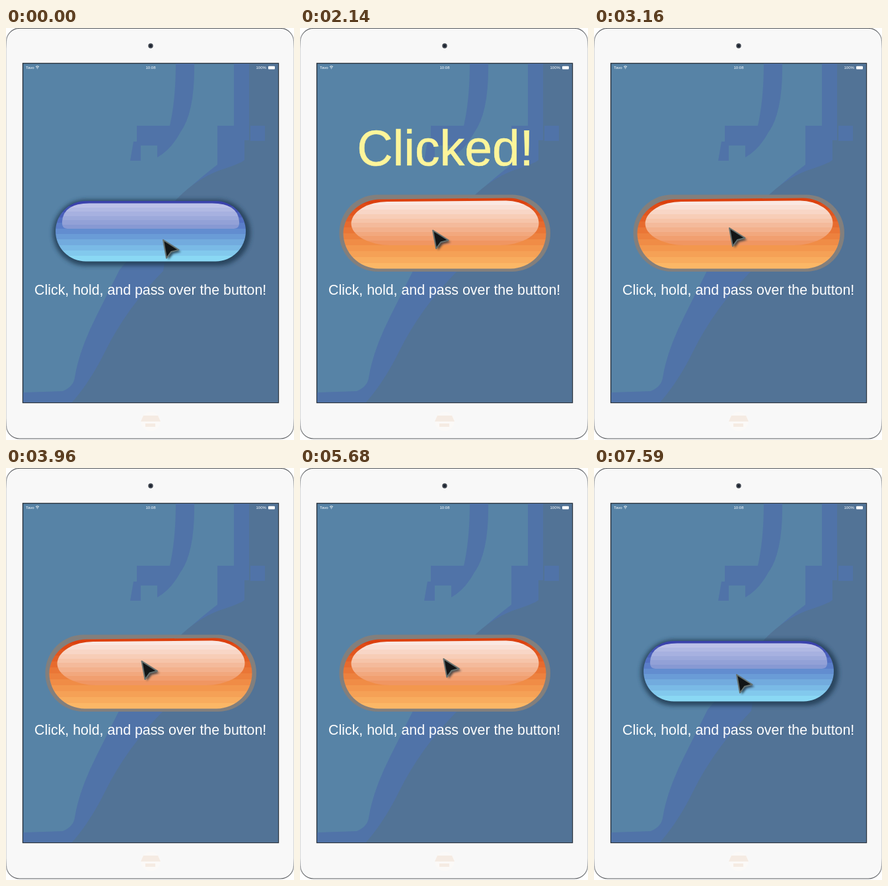
These frames come from a looping animation (436 px wide and 624 px high, 8.35 s). An HTML page:

```html
<!DOCTYPE html>
<html lang="en">
<head>
<meta charset="utf-8">
<title>Button demo</title>
<style>
  html, body { margin: 0; width: 100%; height: 100%; overflow: hidden; background: #fff; }
  svg { display: block; width: 436px; height: 624px; }
  text { font-family: "Liberation Sans", Arial, sans-serif; fill: #fff; }
</style>
</head>
<body>
<svg viewBox="0 0 436 624">
  <defs id="defs">
    <linearGradient id="rim" x1="0" y1="0" x2="0" y2="1">
      <stop offset="0" stop-color="#55585c"/><stop offset=".05" stop-color="#d9dadb"/>
      <stop offset=".95" stop-color="#d9dadb"/><stop offset="1" stop-color="#55585c"/>
    </linearGradient>
    <filter id="soft" x="-20%" y="-30%" width="140%" height="160%"><feGaussianBlur stdDeviation="3"/></filter>
    <filter id="fuzz" x="-50%" y="-50%" width="200%" height="200%"><feGaussianBlur stdDeviation="1.5"/></filter>
    <clipPath id="screen"><rect x="26" y="54" width="386" height="513"/></clipPath>
  </defs>

  <!-- tablet -->
  <rect x=".5" y=".5" width="435" height="621.5" rx="20" fill="#f8f8f8" stroke="url(#rim)" stroke-width="1.2"/>
  <circle cx="219" cy="27" r="3.7" fill="#3e444d"/><circle cx="219" cy="27" r="1.7" fill="#151d2b"/>
  <circle cx="219" cy="596" r="14.5" fill="#fbf9f7"/>
  <path d="M208 587h22l4 9h-30zM211 599h15v5h-15z" fill="#f5ebe3"/>
  <rect x="25.5" y="53.5" width="387" height="514" fill="#5783a6" stroke="#27313c" stroke-width="1.4"/>

  <!-- wallpaper -->
  <g clip-path="url(#screen)">
    <path d="M345 54H412V567H26V552L86 550Q102 543 104 530Q110 490 136 438L172 366L262 258Q282 236 320 207V148H345Z" fill="#5073a8"/>
    <path d="M368 54H412V567H100Q128 535 150 490Q182 425 238 368L256 262Q284 231 322 216Q356 205 361 200V170H368Z" fill="#527396"/>
    <path d="M370 148h22v23h-22z" fill="#5073a8"/>
    <path d="M257 54H285Q286 128 264 158Q250 184 229 196V178H204V201H188L193 172H198V148H248Q257 108 257 54Z" fill="#5073a8"/>
  </g>

  <!-- status bar -->
  <g font-size="6">
    <text x="30" y="62.3">Tavo</text>
    <text x="219" y="62.3" text-anchor="middle">10:08</text>
    <text x="378.5" y="62.3">100%</text>
  </g>
  <path d="M45 58.6q2.5-2 5 0M46 60.2q1.5-1.3 3 0M47.1 61.6h.8" fill="none" stroke="#fff" stroke-width=".9"/>
  <rect x="397" y="57.8" width="10" height="4.6" rx="1" fill="#fff"/>

  <g id="idle">
    <rect x="71" y="260" width="299" height="100" rx="50" fill="#203d55" opacity=".85" filter="url(#soft)"/>
    <rect x="75" y="262" width="288" height="91.5" rx="45.7" fill="url(#blue)"/>
    <path d="M85 293Q87 265.5 126 265.5H312Q351 265.5 353 293Q354 304 345 304H93Q84 304 85 293Z" fill="url(#blueGloss)"/>
  </g>

  <g id="hot">
    <rect x="59.5" y="252.5" width="319.5" height="116.5" rx="58" fill="#827f7d"/>
    <path d="M65.5 311A57 52 0 0 1 122 259.500L316 257.500A57 54 0 0 1 372.500 311A54 54 0 0 1 319 364.500H119A54 54 0 0 1 65.500 311Z" fill="url(#orange)"/>
    <path d="M77.500 296A55 34 0 0 1 132 263L312 261.500A50 34 0 0 1 361.500 296A60 33 0 0 1 302 329H137A60 33 0 0 1 77.500 296Z" fill="url(#orangeGloss)"/>
  </g>

  <text id="clicked" x="86.300" y="208" font-size="75.200" style="fill:#fdf59a;stroke:#fdf59a;stroke-width:.6">Clicked!</text>
  <text x="218.700" y="404" font-size="21.350" text-anchor="middle">Click, hold, and pass over the button!</text>

  <g id="cursor">
    <path d="M2 2L27 17L15 20L8 29Z" fill="#182730" opacity=".7" filter="url(#fuzz)"/>
    <path d="M0 -1L23.500 14L12 17L5 26.500Z" fill="#121516" stroke="#66716f" stroke-width="2" stroke-linejoin="round"/>
  </g>
</svg>
<script>
const LOOP = 8350, PRESS = 840, DRAG = 2170, RELEASE = 7590, LAG = 60;
const el = id => document.getElementById(id);

// Vertical gradient in flat, evenly spaced bands between two RGB colours
function bands(id, from, to, count) {
  let stops = '';
  for (let i = 0; i < count; i++) {
    const color = `rgb(${from.map((c, k) => Math.round(c + (to[k] - c) * i / (count - 1)))})`;
    for (const edge of [i, i + 1]) stops += `<stop offset="${edge / count}" stop-color="${color}"/>`;
  }
  el('defs').insertAdjacentHTML('beforeend',
    `<linearGradient id="${id}" x1="0" y1="0" x2="0" y2="1">${stops}</linearGradient>`);
}
bands('blue', [58, 66, 172], [138, 216, 244], 11);
bands('blueGloss', [188, 193, 232], [135, 153, 211], 6);
bands('orange', [220, 64, 14], [251, 183, 102], 12);
bands('orangeGloss', [250, 232, 226], [240, 150, 98], 10);

// Pointer strokes: start and end time, then the tip's resting place
const strokes = [
  [100, 310, 201, 307], [2110, 2530, 212, 341], [2530, 2950, 217, 322], [2950, 3160, 205, 304],
  [3360, 3720, 206, 206], [3720, 4200, 205, 380], [4200, 4410, 210, 455], [4690, 5050, 223, 221],
  [5220, 5390, 218, 180], [5390, 5890, 217, 357], [6020, 6350, 217, 432], [6550, 7060, 216, 314]
];

function tipAt(t) {
  let x = 238, y = 322;
  for (const [start, end, toX, toY] of strokes) {
    const u = Math.min(1, Math.max(0, (t - start) / (end - start)));
    const e = u * u * (3 - 2 * u);
    x += (toX - x) * e;
    y += (toY - y) * e;
  }
  return [x, y];
}

const show = (id, on) => { el(id).style.display = on ? '' : 'none'; };

function draw() {
  const t = performance.now() % LOOP;
  const hoverY = tipAt(t - LAG)[1];
  const lit = t >= PRESS && t < RELEASE && hoverY > 252 && hoverY < 376;
  show('hot', lit);
  show('idle', !lit);
  show('clicked', t >= PRESS && t < DRAG);
  el('cursor').setAttribute('transform', `translate(${tipAt(t)})`);
  requestAnimationFrame(draw);
}
draw();
</script>
</body>
</html>
```
